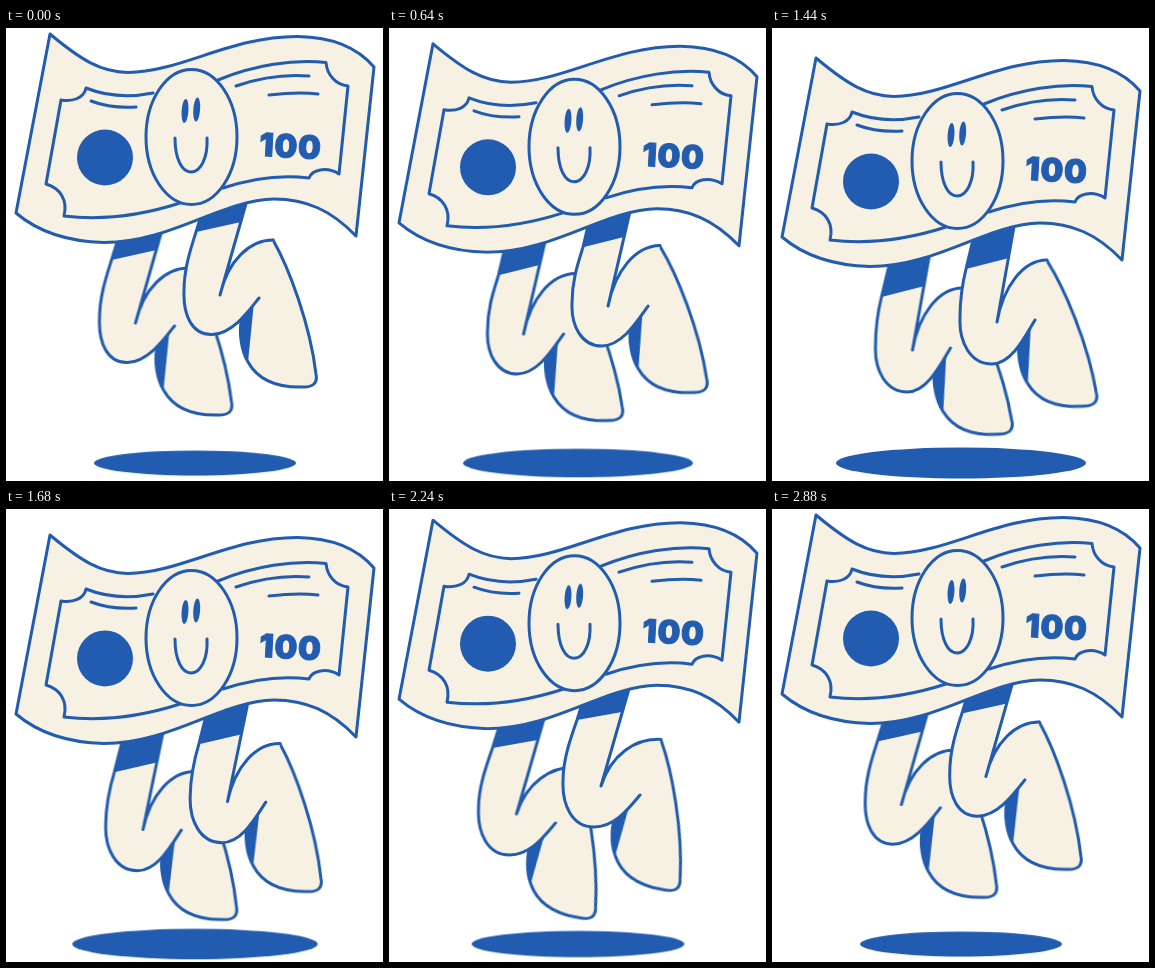
An HTML page without scripts that plays this animation: 377 by 453 pixels, repeating every 2920 ms.

```html
<!DOCTYPE html>
<html lang="en">
<head>
<meta charset="utf-8">
<title>Running banknote</title>
<style>
  :root { --ink: #215cb0; --paper: #f6f1e2; }
  html, body { margin: 0; width: 100%; height: 100%; overflow: hidden; background: #fff; }
  svg { display: block; width: 377px; height: 453px; }
  svg * { animation-duration: 2920ms; animation-iteration-count: infinite; }

  .line { fill: none; stroke: var(--ink); stroke-width: 3; stroke-linecap: round; stroke-linejoin: round; }
  .body { fill: var(--paper); }
  .ink { fill: var(--ink); }
  text { font: 900 32px Inter, "Open Sans", sans-serif; letter-spacing: .8px; stroke: var(--ink); stroke-width: 1; }

  .bill { animation-name: bob; }
  @keyframes bob {
    0% { transform: none; animation-timing-function: cubic-bezier(.62, 0, .32, 1); }
    49.3% { transform: translateY(24px); animation-timing-function: cubic-bezier(.23, .03, .4, 1); }
    98.6%, 100% { transform: none; }
  }

  .shadow { transform-origin: 189px 435px; animation-name: spread; }
  @keyframes spread {
    0% { transform: scale(.808); animation-timing-function: cubic-bezier(.36, 0, .64, 1); }
    39.7% { transform: none; }
    49.3% { transform: none; animation-timing-function: cubic-bezier(.35, 0, .35, 1); }
    98.6%, 100% { transform: scale(.808); }
  }

  .open { animation-name: open; animation-timing-function: step-end; }
  .shut { opacity: 0; stroke-width: 2; animation-name: shut; animation-timing-function: step-end; }
  @keyframes open { 0%, 69.9% { opacity: 1; } 61.6% { opacity: 0; } }
  @keyframes shut { 0%, 69.9% { opacity: 0; } 61.6% { opacity: 1; } }

  /* Legs: the stem bends, the foot swings around its top corner */
  .foot { transform-origin: 267px 212px; animation-name: swing; }
  @keyframes swing {
    0%, 100% { transform: none; animation-timing-function: cubic-bezier(.4, .1, .8, .65); }
    21.9% { transform: translate(4px, 6.3px) rotate(-1.6deg); animation-timing-function: cubic-bezier(.2, .6, .45, 1); }
    49.3% { transform: translate(8px, 20.7px) rotate(-2.7deg); animation-timing-function: cubic-bezier(.5, 0, .7, .7); }
    65.75% { transform: translate(5px, 29px) rotate(9.7deg); animation-timing-function: linear; }
    76.7% { transform: translate(5px, 19px) rotate(10deg); animation-timing-function: linear; }
  }

  .stem { animation-name: bend; }
  @keyframes bend {
    0%, 100% {
      d: path("M253 270C242 284 226 306 206 306.5C186 307 177 287 178 263C178 240 185 220 190 204L200 172L241 172L214 267C222 232 244 212 267 212");
      animation-timing-function: cubic-bezier(.4, .1, .8, .65);
    }
    21.9% {
      d: path("M259 278C248 293 234 317 213 318C192 318 182 297 183 275C183 252 189 235 194 219L202 185L242 179L219 278C226 243 246 218 271 217.5");
      animation-timing-function: cubic-bezier(.2, .6, .45, 1);
    }
    49.3% {
      d: path("M263 292C254 307 240 336 220 336C198 336 187 314 188 290C188 271 190 257 194 241L204 199L243 193L225 294C231 259 251 232 275 232");
      animation-timing-function: cubic-bezier(.5, 0, .7, .7);
    }
    65.75% {
      d: path("M252 296C241 309 227 328 206 328C184 328 174 304 175 280C176 258 183 238 190 221L201 184L242 181L213 289C223 256 246 239 272 240.5");
      animation-timing-function: linear;
    }
    76.7% {
      d: path("M251 286C240 299 226 318 205 318C183 318 173 296 174 272C174 250 182 228 188 211L199 176L242 173L212 277C222 246 246 229 272 230.5");
      animation-timing-function: linear;
    }
  }

  .sock { animation-name: sock; }
  @keyframes sock {
    0%, 100% { d: path("M190 204L200 172L241 172L235 194Z"); animation-timing-function: cubic-bezier(.4, .1, .8, .65); }
    21.9% { d: path("M194 219L202 185L242 179L235 209Z"); animation-timing-function: cubic-bezier(.2, .6, .45, 1); }
    49.3% { d: path("M194 241L204 199L243 193L237 230Z"); animation-timing-function: cubic-bezier(.5, 0, .7, .7); }
    65.75% { d: path("M190 221L201 184L242 181L233 214Z"); animation-timing-function: linear; }
    76.7% { d: path("M188 211L199 176L242 173L233 203Z"); animation-timing-function: linear; }
  }
</style>
</head>
<body>
<svg viewBox="0 0 377 453">
  <ellipse class="shadow ink" cx="189" cy="435" rx="125" ry="15.5"/>

  <g transform="translate(-84.5 28)">
    <g class="foot">
      <path class="line body" d="M267 212C283 240 304 296 310 346C312 356 306 359 298 359C272 360 252 352 242 334C236 324 232 305 236 289"/>
      <path class="ink" d="M236 289C232 305 236 324 242 334L248 274Z"/>
    </g>
    <path class="stem line body" d="M253 270C242 284 226 306 206 306.5C186 307 177 287 178 263C178 240 185 220 190 204L200 172L241 172L214 267C222 232 244 212 267 212"/>
    <path class="sock ink" d="M190 204L200 172L241 172L235 194Z"/>
  </g>

  <g>
    <g class="foot">
      <path class="line body" d="M267 212C283 240 304 296 310 346C312 356 306 359 298 359C272 360 252 352 242 334C236 324 232 305 236 289"/>
      <path class="ink" d="M236 289C232 305 236 324 242 334L248 274Z"/>
    </g>
    <path class="stem line body" d="M253 270C242 284 226 306 206 306.5C186 307 177 287 178 263C178 240 185 220 190 204L200 172L241 172L214 267C222 232 244 212 267 212"/>
    <path class="sock ink" d="M190 204L200 172L241 172L235 194Z"/>
  </g>

  <g class="bill">
    <path class="line body" d="M44 6C75 32 95 44 122 44.5C175 44 225 8 292 8.500C325 9 351 19 368 39L350 208C325 182 300 171 268 171C215 172 165 214.500 98 214.500C60 213.500 30 202 10 185Z"/>
    <path class="line" d="M147 65C122 70 100 68 80 60C78 70 67 74 55 72L40 156C54 160 62 172 58 188C100 193 140 186 174 175"/>
    <path class="line" d="M212 52C248 37 288 31 320 34.500C321 47 330 57 342 58L333 146C320 138 306 142 303 150C280 147 250 149 217 160"/>
    <path class="line" d="M85 73C98 78 114 80 130 79M230 58C253 50 278 46 303 48M263 67C280 65 296 64 312 66"/>
    <circle class="ink" cx="99" cy="129.5" r="28"/>
    <text class="ink" text-anchor="middle" transform="translate(284 129.500) rotate(3)">100</text>

    <ellipse class="line body" cx="185.5" cy="109" rx="45.5" ry="67.5"/>
    <path class="line" d="M169 110C169 131 176 144 185 144C195 144 202 129 201 110"/>
    <g class="open ink">
      <ellipse cx="179" cy="83" rx="3.4" ry="12" transform="rotate(4 179 83)"/>
      <ellipse cx="190.7" cy="81.5" rx="3.4" ry="12" transform="rotate(4 190.7 81.5)"/>
    </g>
    <path class="shut line" d="M173 84C173 95 183 95 183.5 83.5M187.5 83.5C188 94 197 94 197.5 82.5"/>
  </g>
</svg>
</body>
</html>
```
